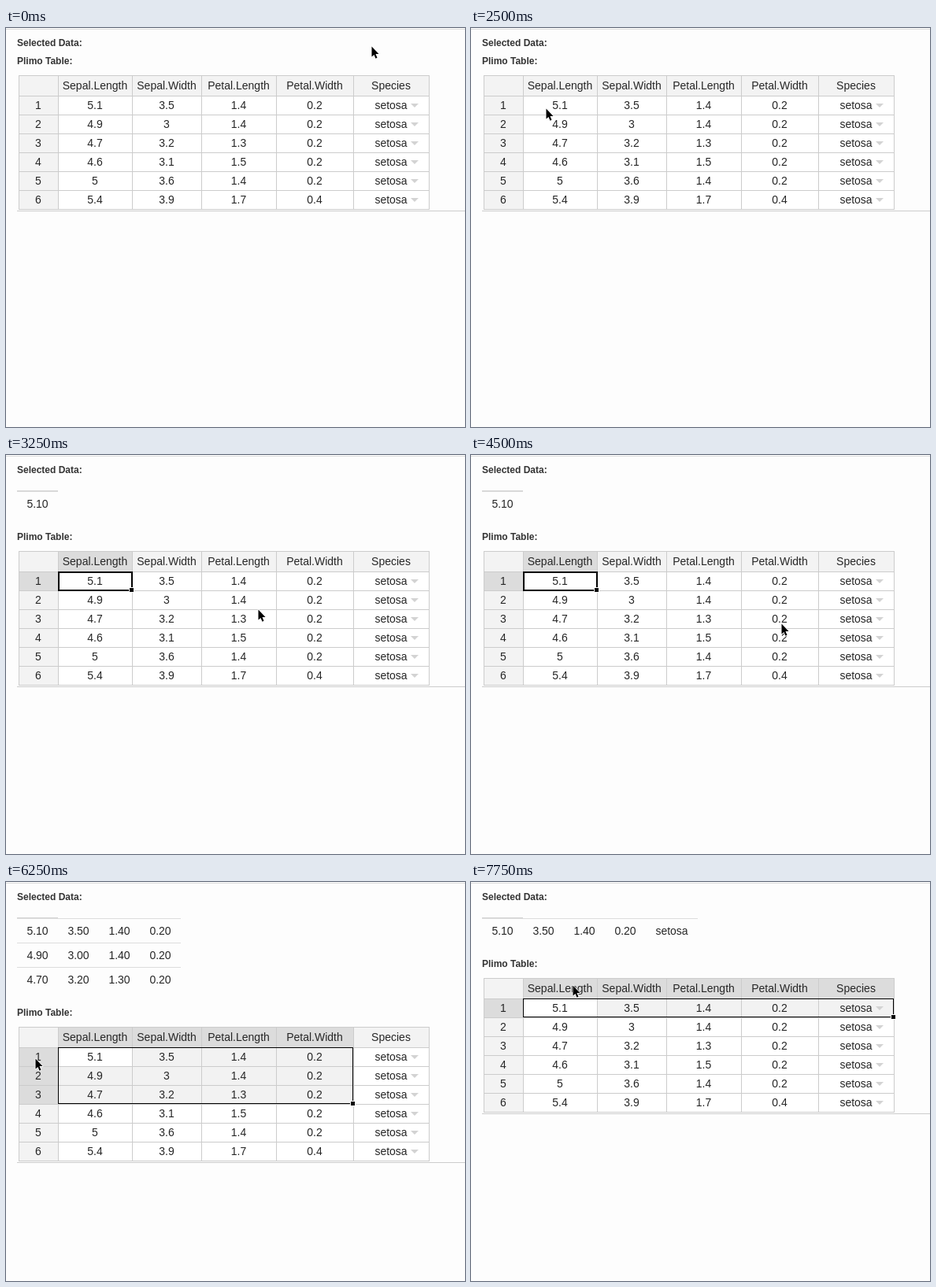
Write an HTML page with a canvas that moves like this. It is 583 px wide and 507 px high and loops after 8000 ms.

```html
<!DOCTYPE html>
<html lang="en">
<head>
<meta charset="utf-8">
<title>Table selection</title>
<style>
html, body { margin: 0; width: 100%; height: 100%; overflow: hidden; background: #fdfdfd; }
canvas { display: block; }
</style>
</head>
<body>
<canvas id="stage" width="583" height="507"></canvas>
<script>
const ctx = document.getElementById('stage').getContext('2d');
const LOOP = 8000, STEP = 250;
const FONT = '"Liberation Sans", Arial, sans-serif';

const TOP = 60, HEAD_H = 26, ROW_H = 24;
const OUT_W = 52, OUT_H = 31;
const COLS = [50, 94, 88, 95, 98, 96].reduce((xs, w) => [...xs, xs[xs.length - 1] + w], [16]);
const HEADS = ['Sepal.Length', 'Sepal.Width', 'Petal.Length', 'Petal.Width', 'Species'];
const DATA = `5.1 3.5 1.4 0.2
4.9 3 1.4 0.2
4.7 3.2 1.3 0.2
4.6 3.1 1.5 0.2
5 3.6 1.4 0.2
5.4 3.9 1.7 0.4`.split('\n').map(line => [...line.split(' '), 'setosa']);

const SELECTIONS = [
  { from: 0, rows: 0, cols: 0 },
  { from: 2750, rows: 1, cols: 1 },
  { from: 4750, rows: 3, cols: 4 },
  { from: 6500, rows: 1, cols: 5 }
];

// Pointer moves: start, end, destination x, y
const ORIGIN = [464, 23];
const MOVES = [
  [0, 250, 182, 152], [250, 500, 118, 82], [500, 2500, 95, 102],
  [3000, 3250, 320, 196], [3250, 3500, 321, 248], [3750, 4500, 394, 214],
  [5500, 5920, 37, 224], [7000, 7750, 129, 131]
];
const ARROW = [[0, 0], [0, 13], [3, 10.4], [5, 15.2], [7, 14.3], [5, 9.6], [9, 9.6]];

const easeOut = p => 1 - (1 - p) ** 2;

function pointerAt(t) {
  return MOVES.reduce(([x, y], [start, end, toX, toY]) => {
    const p = easeOut(Math.min(1, Math.max(0, (t - start) / (end - start))));
    return [x + (toX - x) * p, y + (toY - y) * p];
  }, ORIGIN).map(Math.round);
}

function rect(x, y, w, h, color) {
  ctx.fillStyle = color;
  ctx.fillRect(x, y, w, h);
}

function text(str, x, y, align = 'center', font = '14px ', color = '#262626') {
  ctx.font = font + FONT;
  ctx.textAlign = align;
  ctx.fillStyle = color;
  ctx.fillText(str, x, y);
}

function label(str, y) {
  text(str, 14, y, 'left', 'bold 12px ', '#333');
}

function polygon(points) {
  ctx.beginPath();
  points.forEach(([x, y]) => ctx.lineTo(x, y));
  ctx.closePath();
}

function drawOutput(rows, cols) {
  if (!rows) return;
  const width = cols * OUT_W + (cols === 5 ? 14 : 0);
  rect(14, 45, OUT_W, 1, '#d3d3d3');
  for (let r = 0; r < rows; r++) {
    rect(14, 46 + r * OUT_H, width, 1, '#ddd');
    DATA[r].slice(0, cols).forEach((v, c) => {
      const isName = isNaN(v);
      text(isName ? v : (+v).toFixed(2), 40 + c * OUT_W + (isName ? 7 : 0), 67 + r * OUT_H);
    });
  }
}

function drawGrid(top, rows, cols) {
  const [left, first, second] = COLS;
  const right = COLS[COLS.length - 1];
  const body = top + HEAD_H;
  const bottom = body + DATA.length * ROW_H;
  const center = c => (COLS[c] + COLS[c + 1]) / 2;

  rect(left, top, right - left, bottom - top, '#f3f3f3');
  rect(first, body, right - first, bottom - body, '#fff');
  if (rows) {
    const w = COLS[cols + 1] - first, h = rows * ROW_H;
    rect(first, top, w, HEAD_H, '#dcdcdc');
    rect(left, body, first - left, h, '#dcdcdc');
    rect(first, body, w, h, '#f2f2f2');
    rect(first, body, second - first, ROW_H, '#fff');
  }

  COLS.forEach(x => rect(x, top, 1, bottom - top + 1, '#ccc'));
  rect(left, top, right - left + 1, 1, '#ccc');
  for (let y = body; y <= bottom; y += ROW_H) rect(left, y, right - left + 1, 1, '#ccc');

  HEADS.forEach((h, c) => text(h, center(c + 1), top + 18));
  DATA.forEach((row, r) => {
    const y = body + r * ROW_H;
    text(r + 1, center(0), y + 17);
    row.forEach((v, c) => text(v, center(c + 1), y + 17));
    polygon([[514, y + 10], [524, y + 10], [519, y + 15]]);
    ctx.fillStyle = '#d3d3d3';
    ctx.fill();
  });

  if (rows) drawFrame(body, rows, cols);
  rect(14, bottom + 2, 569, 1, '#ccc');
}

function drawFrame(top, rows, cols) {
  const right = COLS[cols + 1], bottom = top + rows * ROW_H;
  const line = rows * cols === 1 ? 2 : 1;
  const x = COLS[1] + line / 2, y = top + line / 2;
  ctx.strokeStyle = '#000';
  ctx.lineWidth = line;
  ctx.strokeRect(x, y, right - 1 + line / 2 - x, bottom - 1 + line / 2 - y);
  rect(right - 4, bottom - 4, 7, 7, '#fff');
  rect(right - 3, bottom - 3, 5, 5, '#000');
}

function drawPointer([x, y]) {
  ctx.save();
  ctx.translate(x + 0.5, y + 0.5);
  polygon(ARROW);
  ctx.lineJoin = 'round';
  ctx.lineWidth = 1.6;
  ctx.strokeStyle = '#fff';
  ctx.stroke();
  ctx.fillStyle = '#000';
  ctx.fill();
  ctx.restore();
}

function draw(t) {
  const { rows, cols } = SELECTIONS.filter(s => s.from <= t).pop();
  const shift = rows && (rows + 1) * OUT_H;
  rect(0, 0, 583, 507, '#fdfdfd');
  rect(0, 1, 583, 1, '#ddd');
  label('Selected Data:', 23);
  drawOutput(rows, cols);
  label('Plimo Table:', 46 + shift);
  drawGrid(TOP + shift, rows, cols);
  drawPointer(pointerAt(t));
}

const start = performance.now();
function tick() {
  const t = (performance.now() - start) % LOOP;
  draw(Math.floor(t / STEP) * STEP);
  requestAnimationFrame(tick);
}
tick();
</script>
</body>
</html>
```
